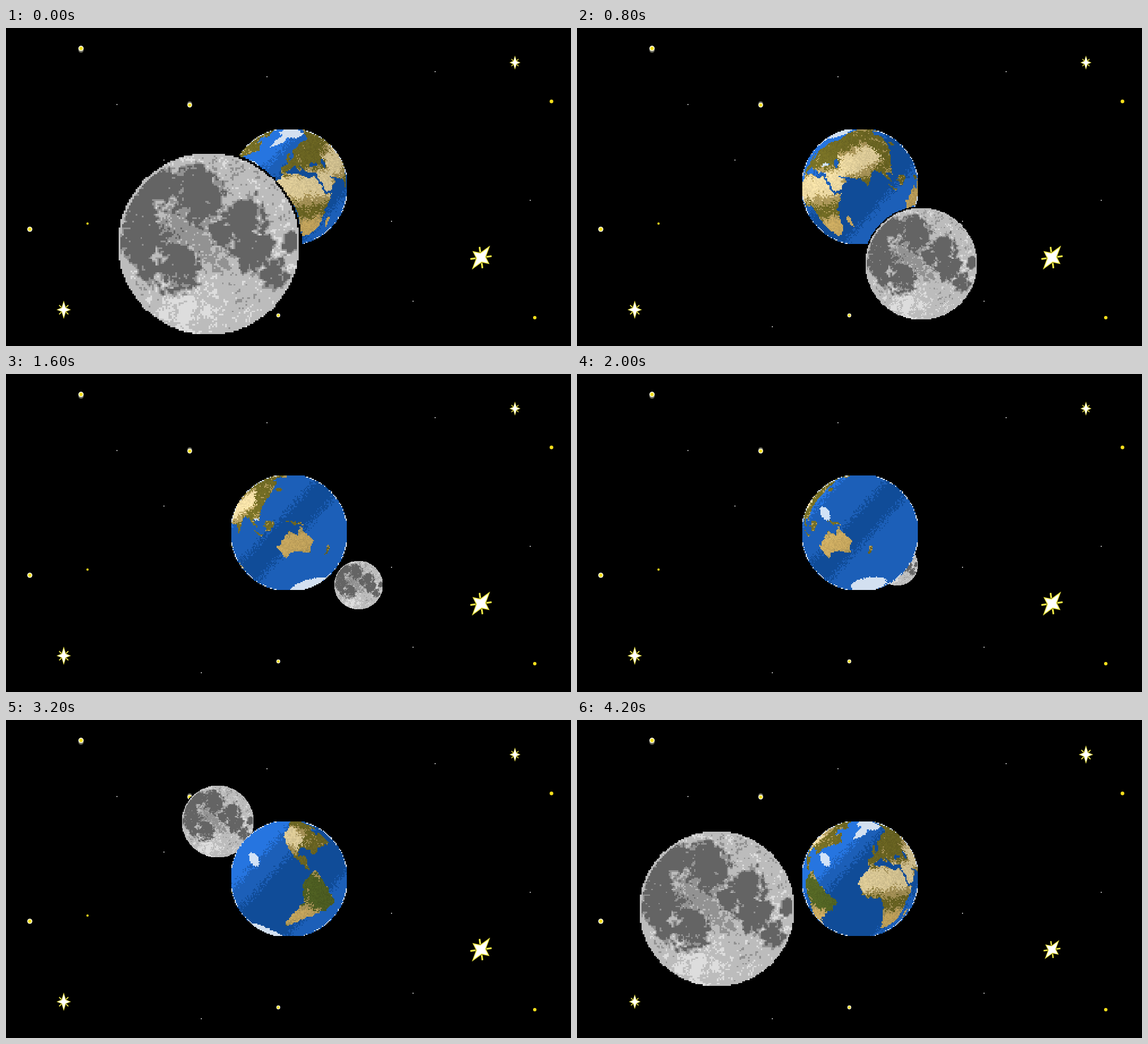
An HTML page with a canvas that plays this animation: 998 px wide and 561 px high, repeating every 4400 ms.

```html
<!DOCTYPE html>
<html>
<head>
<meta charset="utf-8">
<title>Earth and Moon</title>
<style>
html, body { margin: 0; height: 100%; overflow: hidden; background: #000; }
canvas { display: block; }
</style>
</head>
<body>
<canvas id="stage" width="998" height="561"></canvas>
<script>
const STEP = 200, TICKS = 22, RAD = Math.PI / 180;
const ctx = document.getElementById('stage').getContext('2d');
ctx.imageSmoothingEnabled = false;

function layer(w, h) {
  const c = document.createElement('canvas');
  c.width = w;
  c.height = h;
  return c.getContext('2d', { willReadFrequently: true });
}

const clamp = (v, lo, hi) => Math.max(lo, Math.min(hi, v));

function hash(x, y) {
  const s = Math.sin(x * 127.1 + y * 311.7) * 43758.5453;
  return s - Math.floor(s);
}

// Smooth and plain randomness, both within -0.5 to 0.5
function noise(x, y) {
  const i = Math.floor(x), j = Math.floor(y);
  const ease = f => f * f * (3 - 2 * f), u = ease(x - i), v = ease(y - j);
  const row = k => hash(i, k) * (1 - u) + hash(i + 1, k) * u;
  return row(j) * (1 - v) + row(j + 1) * v - 0.5;
}
const grain = (x, y) => hash(x, y) - 0.5;

// ---- Land mask in degrees, two pixels per degree ----
const map = layer(720, 360);
map.setTransform(2, 0, 0, -2, 360, 180);

function land(...p) {
  map.beginPath();
  for (let i = 0; i < p.length; i += 2) map.lineTo(p[i], p[i + 1]);
  map.fill();
}

function blob(lon, lat, rx, ry) {
  map.beginPath();
  map.ellipse(lon, lat, rx, ry, 0, 0, 7);
  map.fill();
}

// Africa
land(-17,15, -16,23, -6,36, 10,37, 20,31, 32,31, 43,11, 51,12, 40,-4, 35,-24, 28,-33, 19,-35, 9,4, -8,4);
// Eurasia
land(-9,37, -9,43, -1,44, -2,48, 8,54, 5,61, 28,71, 70,73, 105,78, 179,69, 156,51, 150,59, 136,54, 140,48, 127,35,
  122,30, 110,20, 106,10, 100,14, 103,1, 95,17, 89,22, 77,8, 73,18, 57,26, 50,30, 59,22, 45,13, 35,29, 36,36,
  23,37, 13,45, 18,40, 15,38, 9,44, -5,36);
// North and South America
land(-168,66, -125,70, -82,68, -94,60, -82,54, -78,61, -56,52, -75,38, -81,25, -84,30, -97,28, -96,19, -88,21,
  -78,8, -105,20, -123,38, -125,49, -140,60);
land(-77,8, -72,12, -50,0, -35,-6, -39,-15, -58,-37, -68,-55, -75,-50, -71,-20, -81,-5);
// Australia, Greenland and islands
land(114,-22, 130,-12, 139,-18, 142,-11, 153,-27, 149,-38, 130,-32, 116,-35);
land(-55,82, -20,82, -22,70, -43,60);
land(131,0, 150,-10, 138,-8);
land(95,5, 106,-5, 104,-7);
land(173,-35, 178,-38, 167,-47);
blob(-2, 53, 3, 5);
blob(47, -19, 2, 6);
blob(114, 1, 5, 5);
blob(137, 36, 3, 4);
// Inland seas
map.globalCompositeOperation = 'destination-out';
blob(34, 43, 6, 2);
blob(51, 42, 3, 5);
const mask = map.getImageData(0, 0, 720, 360).data;

function isLand(lon, lat) {
  const x = ((Math.floor(lon * 2 + 360) % 720) + 720) % 720, y = clamp(Math.floor(180 - lat * 2), 0, 359);
  return mask[(y * 720 + x) * 4 + 3] > 127;
}

// ---- Earth: the tilted globe turns about the vertical of the screen ----
const earth = layer(102, 101);
const TILT = 23.4 * RAD, LEAN = 8;
const TAN = [166, 146, 86], OLIVE = [107, 101, 34], SAND = [219, 201, 150], OCHRE = [194, 163, 92], JUNGLE = [79, 96, 34];
const LIGHT = [38, 117, 224], MID = [28, 95, 184], DARK = [16, 76, 152], GLOSS = [210, 226, 246], ICE = [211, 224, 240];

// A dry belt decides between sand, steppe and forest
function climate(lon, lat) {
  const americas = lon < -30, north = lat > 0;
  const humid = north && (lon > 105 || americas && lon > -98);
  const belt = americas || lon > 55 && north ? 37 : 23;
  const dry = (humid ? 0.1 : Math.exp(-(((Math.abs(lat) - belt) / 13) ** 2))) + noise(lon / 5, lat / 5) * 0.5;
  if (dry > 0.52) return north ? SAND : OCHRE;
  if (dry > 0.22) return TAN;
  return americas && lat < 10 ? JUNGLE : OLIVE;
}

function ocean(x, y, fuzz, sun) {
  const gx = x + 62 - (y + 34) * 0.3, gy = y + 34;
  if (Math.hypot(gx / 8, gy / 12) + fuzz * 0.3 < 1) return GLOSS;
  const u = x + y * 0.92 + fuzz * 24;
  if (u < -95 + 25 * sun) return LIGHT;
  return u < -38 || u > 70 + 50 * sun ? MID : DARK;
}

function drawEarth(tick) {
  const view = 2 + tick * 360 / TICKS, sun = Math.cos((view + 30) * RAD);
  const img = earth.createImageData(102, 101);
  for (let j = 0; j < 101; j++) for (let i = 0; i < 102; i++) {
    const px = (i - 50.5) * 2, py = (j - 50) * 2;
    const X = px / 104, Y = -py / 104, d = X * X + Y * Y;
    if (d > 1) continue;
    const az = Math.atan2(X, Math.sqrt(1 - d)) + (view - LEAN) * RAD, h = Math.sqrt(1 - Y * Y);
    const front = h * Math.cos(az);
    const lat = Math.asin(Y * Math.cos(TILT) + front * Math.sin(TILT)) / RAD;
    const turn = LEAN + Math.atan2(h * Math.sin(az), front * Math.cos(TILT) - Y * Math.sin(TILT)) / RAD;
    const lon = (turn + 540) % 360 - 180;
    const a = Math.floor(lon), b = Math.floor(lat);
    const ragged = noise(lon / 3, lat / 3) * 3;
    let color;
    if (d > 0.967 && hash(i, j + 9) > 0.5) color = ICE;
    else if (lat + ragged > 79 || lat + ragged < -72) color = ICE;
    else if (!isLand(lon + ragged, lat + noise(lat / 3, lon / 3 + 40) * 3)) color = ocean(px, py, grain(i, j), sun);
    else if (lat > 59 && lon > -60 && lon < -18) color = ICE;
    else {
      const glow = Math.max(0, 1 - Math.hypot(X + 0.6, Y - 0.33) / 0.6);
      const shade = 1 + grain(a + 7, b) * 0.12 - X * 0.08 + glow * 0.1;
      color = climate(lon + grain(a, b) * 7, lat + grain(b, a) * 7).map(c => c * shade);
    }
    img.data.set([...color, 255], (j * 102 + i) * 4);
  }
  earth.putImageData(img, 0, 0);
}

// ---- Moon: dark seas as x, y and size, broken up by noise ----
const moon = layer(112, 112);
const SEAS = [
  [-0.76, -0.35, 0.22], [-0.74, -0.05, 0.2], [-0.58, -0.7, 0.18], [-0.12, -0.58, 0.24], [0.4, -0.3, 0.18],
  [0.5, 0.06, 0.19], [0.88, -0.01, 0.09], [0.73, 0.32, 0.13], [-0.68, 0.28, 0.1], [-0.35, 0.28, 0.2], [0.14, -0.12, 0.11]
];
const GRAYS = [100, 146, 188, 221];

function drawMoon() {
  const img = moon.createImageData(112, 112);
  for (let j = 0; j < 112; j++) for (let i = 0; i < 112; i++) {
    const x = (i - 55.5) / 54.5, y = (j - 55.5) / 54.5, d = Math.hypot(x, y);
    if (d > 1.025) continue;
    const near = (cx, cy, r) => Math.max(0, 1 - Math.hypot(x - cx, y - cy) / r);
    const rough = noise(i / 5, j / 5) + noise(i / 2, j / 2);
    const sea = Math.min(...SEAS.map(([sx, sy, r]) => Math.hypot(x - sx, (y - sy) * 0.9) / r)) + rough * 0.55;
    let v = 2 + rough * 0.9 + grain(i, j) * 0.7 + near(-0.24, 0.65, 0.5) - near(-0.15, -0.2, 0.8);
    v -= 2 * clamp((1.35 - sea) / 0.4, 0, 1);
    if (d > 0.97) v = Math.max(v, 2 + grain(j, i));
    const g = d > 1 ? 0 : GRAYS[clamp(Math.round(v), 0, 3)];
    img.data.set([g, g, g, 255], (j * 112 + i) * 4);
  }
  moon.putImageData(img, 0, 0);
}

// Key points of the orbit: tick, x, y, radius
const ORBIT = [
  [0, 358, 381, 159], [1, 447, 391, 150], [2, 528, 422, 141], [6, 652, 398, 60], [10, 566, 337, 36],
  [14, 470, 235, 40], [18, 270, 151, 92], [20, 199, 262, 119], [21, 247, 333, 136]
];

// Smooth closed curve through the key points
function orbitAt(tick) {
  const n = ORBIT.length;
  const key = k => {
    const [t, ...pose] = ORBIT[(k + n) % n];
    return [t + Math.floor(k / n) * TICKS, ...pose];
  };
  const k = ORBIT.findLastIndex(p => p[0] <= tick);
  const [a, b, c, d] = [k - 1, k, k + 1, k + 2].map(key);
  const span = c[0] - b[0], s = (tick - b[0]) / span;
  return [1, 2, 3].map(i => {
    const m = (c[i] - a[i]) / (c[0] - a[0]) * span, o = (d[i] - b[i]) / (d[0] - b[0]) * span;
    const e = c[i] - b[i];
    return b[i] + s * (m + s * (3 * e - 2 * m - o + s * (m + o - 2 * e)));
  });
}

// ---- Stars ----
const WHITE = '#fffbe0', YELLOW = '#f7e01c', GRAY = '#65655a';

function dot(color, x, y, r) {
  ctx.fillStyle = color;
  ctx.beginPath();
  ctx.arc(x, y, r, 0, 7);
  ctx.fill();
}

function bead(x, y, r, shadow = 0) {
  if (shadow) dot(GRAY, x, y + shadow, r);
  dot(WHITE, x, y, r);
  dot(YELLOW, x, y, r * 0.65);
}

function star(x, y, r, angle, side) {
  ctx.save();
  ctx.translate(x, y);
  ctx.rotate(angle);
  ctx.strokeStyle = '#f3ec45';
  ctx.lineWidth = r * 0.14;
  ctx.beginPath();
  for (let k = 0; k < 4; k++) {
    const a = (k + 0.5) * Math.PI / 2, c = Math.cos(a) * r, s = Math.sin(a) * r;
    ctx.moveTo(c * 0.45, s * 0.45);
    ctx.lineTo(c * 0.88, s * 0.88);
  }
  ctx.stroke();
  ctx.beginPath();
  for (let k = 0; k < 8; k++) {
    const q = r * (k % 2 ? 0.33 : k % 4 ? side : 1);
    ctx.lineTo(Math.sin(k * Math.PI / 4) * q, -Math.cos(k * Math.PI / 4) * q);
  }
  ctx.closePath();
  ctx.stroke();
  ctx.fillStyle = '#fff';
  ctx.fill();
  ctx.restore();
}

function drawSky(odd) {
  ctx.fillStyle = '#000';
  ctx.fillRect(0, 0, 998, 561);
  ctx.fillStyle = '#fff';
  for (const [x, y] of [[461, 86], [758, 77], [196, 135], [279, 233], [681, 341], [926, 304], [719, 482], [345, 527]])
    ctx.fillRect(x - 0.8, y - 0.8, 1.6, 1.6);
  bead(132.5, 36, 4.7, 3);
  bead(324.5, 136, 4.2, -2.5);
  bead(42, 355, 4.5);
  bead(481, 507, 3.4);
  dot(YELLOW, 144, 345, 2);
  dot(YELLOW, 963.5, 129.5, 3.2);
  dot(YELLOW, 934, 511, 3);
  star(102, 497, odd ? 10.5 : 13, 0, 0.8);
  star(899, 61, odd ? 13 : 10, 0, 0.8);
  star(839, 405, odd ? 17 : 21.5, 0.65, 0.72);
}

function render(tick) {
  drawSky(tick % 2);
  drawEarth(tick);
  const [x, y, r] = orbitAt(tick), half = r * 1.035;
  const showMoon = () => ctx.drawImage(moon.canvas, x - half, y - half, half * 2, half * 2);
  const showEarth = () => ctx.drawImage(earth.canvas, 398, 179, 204, 202);
  const behind = tick > 6 && tick < 18;
  for (const show of behind ? [showMoon, showEarth] : [showEarth, showMoon]) show();
}

drawMoon();
let shown = -1;
function loop() {
  const tick = Math.floor(performance.now() / STEP) % TICKS;
  if (tick !== shown) render(shown = tick);
  requestAnimationFrame(loop);
}
loop();
</script>
</body>
</html>
```
